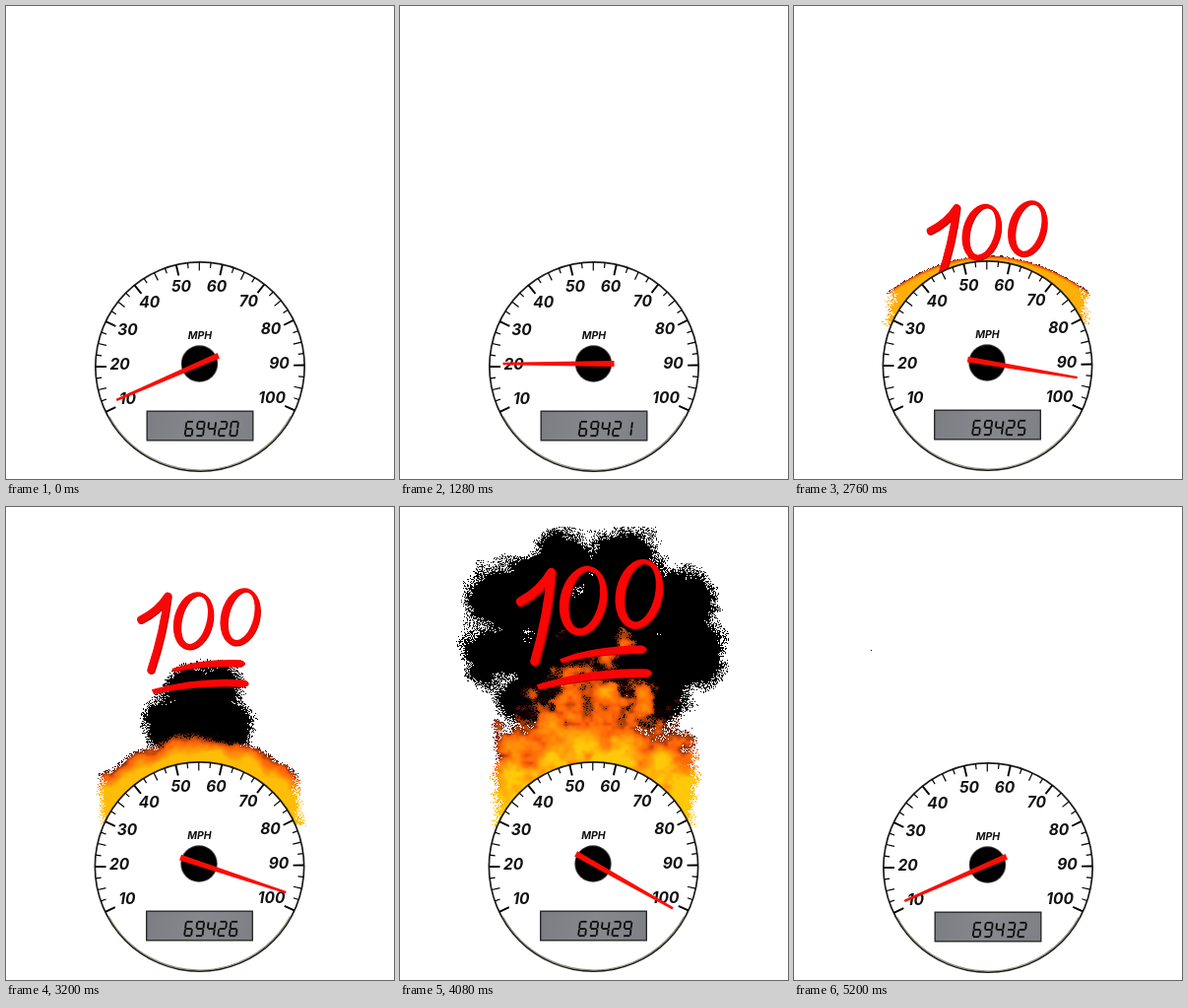
These frames come from a looping animation (394 px wide and 480 px high, 5.24 s). An HTML page with a canvas:

```html
<!DOCTYPE html>
<html lang="en">
<head>
<meta charset="utf-8">
<title>Speedometer</title>
<style>
html, body { margin: 0; width: 100%; height: 100%; overflow: hidden; background: #fff; }
canvas { display: block; }
</style>
</head>
<body>
<canvas id="stage" width="394" height="480"></canvas>
<script>
const W = 394, H = 480, LOOP = 5240, STEP = 40, CX = 197;
const ctx = document.getElementById('stage').getContext('2d');
const cloud = document.createElement('canvas');
const CLOUD_H = 335;
cloud.width = W;
cloud.height = CLOUD_H;
const cloudCtx = cloud.getContext('2d');
const image = cloudCtx.createImageData(W, CLOUD_H);
const pixels = new Uint32Array(image.data.buffer);

const clamp = (v, lo = 0, hi = 1) => Math.max(lo, Math.min(hi, v));
const mix = (a, b, p) => a + (b - a) * p;
const radians = degrees => degrees * Math.PI / 180;

// Monotone cubic curve through [time, value] points.
function track(...keys) {
  const slope = i => (keys[i + 1][1] - keys[i][1]) / (keys[i + 1][0] - keys[i][0]);
  const last = keys.length - 1;
  const tangent = keys.map((k, i) => {
    if (i === 0 || i === last) return 0;
    const a = slope(i - 1), b = slope(i);
    return a * b <= 0 ? 0 : 2 * a * b / (a + b);
  });
  return t => {
    if (t <= keys[0][0]) return keys[0][1];
    if (t >= keys[last][0]) return keys[last][1];
    const i = keys.findIndex(k => k[0] > t) - 1;
    const [t0, v0] = keys[i], [t1, v1] = keys[i + 1];
    const d = t1 - t0, p = (t - t0) / d, q = 1 - p;
    return v0 * (1 + 2 * p) * q * q + v1 * p * p * (3 - 2 * p)
      + d * p * q * (tangent[i] * q - tangent[i + 1] * p);
  };
}

const needleAngle = track([0, -23.5], [1280, 0], [2760, 189.4], [3600, 203.5],
  [4080, 209.4], [4560, 203.5], [5160, -23.5]);
const mileage = track([0, 0], [1280, 1.4], [2760, 5.4], [4560, 11.1], [5240, 12.6]);
const scoreY = track([2500, 350], [2760, 251], [3360, 122], [3600, 120], [4080, 121],
  [4560, 162], [4900, 350]);
const scoreScale = track([2700, 0.94], [3600, 1], [4080, 1.15], [4560, 1]);
const flameTop = track([2300, 285], [2760, 253], [3600, 207], [4080, 146], [4560, 160], [5120, 300]);
const flameDepth = track([2760, 5], [3600, 56], [4080, 130], [4560, 88], [4860, 10]);
const smokeY = track([2900, 330], [3600, 140], [4560, 132]);
const smokeWidth = track([2900, 20], [3600, 55], [4080, 96], [4560, 112]);

function hash(x, y) {
  let h = Math.imul(x, 374761393) + Math.imul(y, 668265263);
  h = Math.imul(h ^ (h >>> 13), 1274126177);
  return ((h ^ (h >>> 16)) >>> 0) / 4294967296;
}

function noise(x, y) {
  const ix = Math.floor(x), iy = Math.floor(y);
  let u = x - ix, v = y - iy;
  u *= u * (3 - 2 * u);
  v *= v * (3 - 2 * v);
  return mix(mix(hash(ix, iy), hash(ix + 1, iy), u),
    mix(hash(ix, iy + 1), hash(ix + 1, iy + 1), u), v);
}

// Layered noise centred on zero.
const turbulence = (x, y) =>
  noise(x, y) * 0.55 + noise(x * 2.1, y * 2.1) * 0.3 + noise(x * 4.3, y * 4.3) * 0.15 - 0.5;

function fireColor(heat) {
  const r = 255 * clamp(heat * 2);
  const g = 200 * clamp((heat - 0.12) / 1.1) ** 0.7;
  return (255 << 24 | 8 << 16 | g << 8 | r) >>> 0;
}

// A core with a ring of lobes around it.
function smokePuffs(t) {
  const w = smokeWidth(t), y = smokeY(t), h = 74, count = 9;
  const puffs = [[CX, y, w * 1.1 + 10, h * 1.25]];
  for (let i = 0; i < count; i++) {
    const a = (i + 0.25) / count * Math.PI * 2;
    const r = (26 + w * 0.2) * mix(0.9, 1.2, hash(i, 5));
    puffs.push([CX + Math.cos(a) * w, y + Math.sin(a) * h, r, r]);
  }
  return puffs;
}

function smokeDensity(x, y, puffs) {
  let best = -1;
  for (const [px, py, rx, ry] of puffs) {
    const dx = (x - px) / rx, dy = (y - py) / ry;
    best = Math.max(best, 1 - dx * dx - dy * dy);
  }
  return best;
}

function drawCloud(t) {
  if (t < 2300) return;
  pixels.fill(0);
  const puffs = t > 2900 ? smokePuffs(t) : [];
  const fade = clamp((t - 4400) / 760) * 1.6;
  const top = flameTop(t), depth = flameDepth(t);
  const curve = 33 + depth * 0.5, rough = clamp(depth / 40, 0.12, 1);
  const lift = t * 0.075;
  for (let y = 20; y < CLOUD_H; y++) {
    for (let x = 36; x < 359; x++) {
      const grain = hash(x + 911, y + 77);
      let color = 0;
      const d = smokeDensity(x, y, puffs);
      if (d > -0.5) {
        const n = turbulence(x / 26 + 7, (y + lift * 0.3) / 22);
        if (d * 1.2 + n * 1.2 - fade > grain * 0.7 - 0.08) color = 0xff000000;
      }
      const u = (x - CX) / 100;
      const below = (y - top - curve * u * u) / depth;
      if (Math.abs(u) < 1.16 && below * depth > -32 * rough) {
        const n = turbulence(x / 19, (y + lift) / 17);
        const side = (1.05 + n * 0.16 - Math.abs(u)) * 9;
        const base = (324 - y + n * 12) / 7;
        const glow = clamp((y - 230) / 130) * rough;
        const heat = Math.max(below + n * 1.5 * rough + 0.17 + glow, below * 0.7);
        const cover = Math.min(side, base, heat * 2.5);
        if (cover > 0.1 + grain * 0.85) color = fireColor(Math.min(heat, mix(1, 1.25, rough)));
      }
      pixels[y * W + x] = color;
    }
  }
  cloudCtx.putImageData(image, 0, 0);
  ctx.drawImage(cloud, 0, 0);
}

const one = new Path2D('M-62 -23Q-44 -32 -34 -48Q-38 -10 -51 30');
const rings = new Path2D();
for (const [x, y] of [[-6.5, -22], [43, -26.5]]) {
  for (const [rx, ry, shift] of [[20.5, 31, 0], [13.2, 26, 1]]) {
    rings.moveTo(x, y);
    const ring = new Path2D();
    ring.ellipse(x + shift, y - shift, rx, ry, 0.24, 0, Math.PI * 2);
    rings.addPath(ring);
  }
}
const underlines = new Path2D(
  'M-29 29Q0 18 44 19Q52 22 44 26Q0 25 -27 32Z M-50 51Q0 37 48 40Q56 43 48 47Q0 45 -48 55Z');

function drawScore(t) {
  const y = scoreY(t);
  if (y > 340) return;
  const s = scoreScale(t);
  ctx.save();
  ctx.translate(CX - (s > 1 ? 2 : 0) * (s - 1) / 0.15, y);
  ctx.rotate((1 - s) * 0.2);
  ctx.scale(s, s);
  ctx.lineCap = ctx.lineJoin = 'round';
  const paint = (color, width) => {
    ctx.fillStyle = ctx.strokeStyle = color;
    ctx.lineWidth = width;
    ctx.stroke(one);
    ctx.fill(rings, 'evenodd');
    ctx.fill(underlines);
  };
  paint('#b80000', 8.5);
  ctx.translate(-0.7, -0.8);
  paint('#fa0505', 7.5);
  ctx.restore();
}

function line(x0, y0, x1, y1) {
  ctx.beginPath();
  ctx.moveTo(x0, y0);
  ctx.lineTo(x1, y1);
  ctx.stroke();
}

function disc(x, y, r, fill) {
  ctx.beginPath();
  ctx.arc(x, y, r, 0, Math.PI * 2);
  ctx.fillStyle = fill;
  ctx.fill();
}

function drawDial() {
  const cy = 366, rim = 107;
  disc(CX, cy, rim, '#1c1c1a');
  disc(CX, cy, rim - 1.7, '#fff');
  ctx.strokeStyle = '#8c8c7c';
  ctx.lineWidth = 1.2;
  ctx.beginPath();
  ctx.arc(CX, cy, rim - 2, 0.5, 2.64);
  ctx.stroke();
  ctx.strokeStyle = '#000';
  ctx.textAlign = 'center';
  ctx.font = 'italic bold 15.5px Inter, "Liberation Sans", sans-serif';
  for (let i = 0; i <= 36; i++) {
    const a = radians(154.4 + i * 6.4), c = Math.cos(a), s = Math.sin(a);
    const major = i % 4 === 0, inner = rim - (major ? 12 : i % 4 === 2 ? 9.5 : 6.5);
    ctx.lineWidth = major ? 1.9 : 1.2;
    line(CX + c * (rim - 1), cy + s * (rim - 1), CX + c * inner, cy + s * inner);
    if (!major) continue;
    ctx.fillStyle = '#111';
    ctx.fillText(10 + i * 2.5, CX - 0.5 + c * 81, 369 + s * 81);
  }
  ctx.font = 'italic bold 10.5px Inter, "Liberation Sans", sans-serif';
  ctx.fillText('MPH', CX, 338);
  disc(196.5, 363, 18.7, '#444');
  disc(196.5, 363, 17.8, '#000');
}

// Lit segments for the digits 0 to 9.
const lit = ['abcdef', 'bc', 'abged', 'abgcd', 'fgbc', 'afgcd', 'afgedc', 'abc', 'abcdefg', 'abcdfg'];
const segments = { a: [0, 0, 1, 0], b: [1, 0, 1, 1], c: [1, 1, 1, 2], d: [0, 2, 1, 2],
  e: [0, 1, 0, 2], f: [0, 0, 0, 1], g: [0, 1, 1, 1] };

function drawOdometer(t) {
  const shade = ctx.createLinearGradient(143, 411, 250, 441);
  shade.addColorStop(0, '#7c7d82');
  shade.addColorStop(0.5, '#87888d');
  shade.addColorStop(1, '#7f8085');
  ctx.fillStyle = shade;
  ctx.fillRect(143, 411, 108, 30);
  ctx.strokeStyle = '#2a2a2c';
  ctx.lineWidth = 1.4;
  ctx.strokeRect(143.2, 411.2, 107.6, 29.6);
  ctx.strokeStyle = '#0a0a0a';
  ctx.lineWidth = 1.8;
  const miles = 69420 + Math.floor(mileage(t));
  [...String(miles)].forEach((digit, i) => {
    const px = (x, y) => 181.6 + i * 11.4 + x * 7 + (2 - y) * 0.9;
    const py = y => 421.8 + y * 7.2;
    for (const name of lit[digit]) {
      const [x0, y0, x1, y1] = segments[name];
      const gx = y0 === y1 ? 0.06 : 0, gy = y0 === y1 ? 0 : 0.07;
      line(px(x0 + gx, y0 + gy), py(y0 + gy), px(x1 - gx, y1 - gy), py(y1 - gy));
    }
  });
}

function drawNeedle(angle) {
  ctx.save();
  ctx.translate(CX, 363);
  ctx.rotate(radians(angle));
  ctx.fillStyle = '#fc0d05';
  ctx.beginPath();
  ctx.moveTo(-92.5, -1.2);
  ctx.lineTo(20.5, -3);
  ctx.lineTo(20.5, 3);
  ctx.lineTo(-92.5, 1.2);
  ctx.fill();
  ctx.restore();
}

function render(t) {
  ctx.fillStyle = '#fff';
  ctx.fillRect(0, 0, W, H);
  drawCloud(t);
  drawScore(t);
  const angle = needleAngle(t), pull = clamp(angle / 190);
  ctx.save();
  ctx.translate(-0.5 * pull, -pull);
  drawDial();
  drawOdometer(t);
  drawNeedle(angle);
  ctx.restore();
}

const start = performance.now();
let shown = -1;
function tick() {
  const t = Math.floor((performance.now() - start) % LOOP / STEP) * STEP;
  if (t !== shown) render(shown = t);
  requestAnimationFrame(tick);
}
tick();
</script>
</body>
</html>
```
